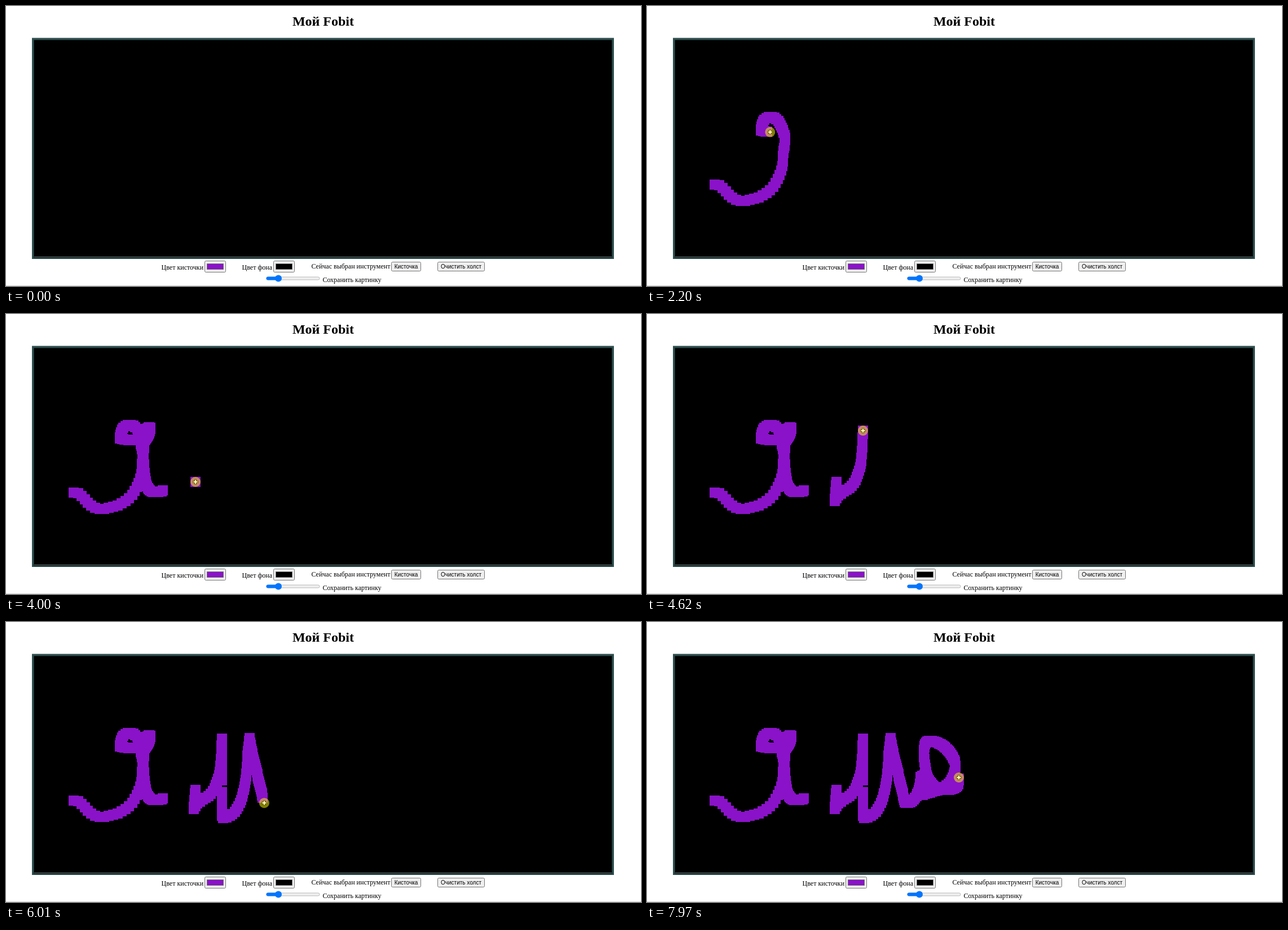
Recreate the animation shown at these times as an HTML page with a canvas. Size 1126 by 497 pixels, loop 8 s.

```html
<!DOCTYPE html>
<html lang="ru">
<head>
<meta charset="utf-8">
<style>
html, body { margin: 0; width: 1126px; height: 497px; overflow: hidden; background: #fff; }
canvas { display: block; }
</style>
</head>
<body>
<canvas id="stage" width="1126" height="497"></canvas>
<script>
const ctx = document.getElementById('stage').getContext('2d');
const LOOP = 8000, STEP = 70, BRUSH = 18, LAG = 38, STAMP_EVERY = 16;
const PURPLE = '#8a12c8', SLATE = '#2f4f4f';
const SERIF = '"Liberation Serif", "Times New Roman", serif';
const SANS = '"Liberation Sans", Arial, sans-serif';

const linear = k => k;
const easeOut = k => 1 - (1 - k) ** 2;

function leg(from, to, d, ease = linear) {
  const path = document.createElementNS('http://www.w3.org/2000/svg', 'path');
  path.setAttribute('d', d);
  return { from, to, path, ease, length: path.getTotalLength() };
}

// The pointer follows these curves and rests between them.
const legs = [
  leg(70, 810, 'M964 460 C560 330 200 212 127 312', easeOut),
  leg(890, 1080, 'M127 312 L121 316'),
  leg(1230, 1570, 'M120 317 C134 313 146 346 166 346 S235 338 241 274'),
  leg(1570, 1990, 'M241 274 C241 255 247 240 244 230 S234 197 221 197 S202 207 202 221'),
  leg(2060, 2900, 'M202 221 C210 223 230 227 238 220 S250 201 254 201 S256 214 239 232'),
  leg(2900, 3480, 'M239 232 C245 245 244 275 247 293 S255 316 265 316 S279 314 279 311'),
  leg(3580, 3930, 'M279 311 Q300 312 336 298'),
  leg(4010, 4490, 'M336 298 L333 333 C340 312 360 318 371 293 S381 240 383 207'),
  leg(4620, 4700, 'M383 207 V283'),
  leg(4720, 5180, 'M383 302 V348 C418 347 426 292 428 240'),
  leg(5180, 5390, 'M428 240 L432 206'),
  leg(5520, 6290, 'M432 206 C436 240 447 270 457 321 C475 324 485 300 485 275 L492 271'),
  leg(6360, 6780, 'M492 271 L487 308 C505 298 541 303 547 259'),
  leg(6780, 7130, 'M547 259 C547 232 520 211 500 211'),
  leg(7200, 7930, 'M500 211 C486 211 492 250 494 262 C497 285 510 298 530 298 S553 290 553 276')
];
const presses = [[1230, 3480], [3930, 4700], [4720, LOOP]];
const bursts = [70, 890, 1230, 2060, 2900, 3730, 4620, 5520, 6360, 7200];

function snap(t) {
  const start = bursts.findLast(b => b <= t) ?? 0;
  return start + Math.floor((t - start + 10) / STEP) * STEP;
}

function pointerAt(t) {
  const current = legs.findLast(l => l.from <= t) ?? legs[0];
  const k = Math.min(1, Math.max(0, (t - current.from) / (current.to - current.from)));
  return current.path.getPointAtLength(current.ease(k) * current.length);
}

const stamps = [];
for (const [from, to] of presses) {
  for (let t = from; t <= to; t += STAMP_EVERY) {
    const { x, y } = pointerAt(t);
    stamps.push({ t, x: Math.round(x), y: Math.round(y) });
  }
}

function rect(x, y, w, h, color) {
  ctx.fillStyle = color;
  ctx.fillRect(x, y, w, h);
}

function outline(color) {
  ctx.strokeStyle = color;
  ctx.lineWidth = 1;
  ctx.stroke();
}

function box(x, y, w, h, radius, fill, stroke) {
  ctx.beginPath();
  ctx.roundRect(x, y, w, h, radius);
  ctx.fillStyle = fill;
  ctx.fill();
  if (stroke) outline(stroke);
}

function disc(x, y, r, color) {
  ctx.beginPath();
  ctx.arc(x, y, r, 0, Math.PI * 2);
  ctx.fillStyle = color;
  ctx.fill();
}

function text(label, x, y, font = '12px ' + SERIF, align = 'left') {
  ctx.font = font;
  ctx.textAlign = align;
  ctx.fillStyle = '#000';
  ctx.fillText(label, x, y);
}

function colorInput(x, color) {
  box(x + 0.5, 452.5, 37, 20, 2, '#efefef', '#767676');
  box(x + 4.5, 457.5, 29, 10, 0, color, '#777');
}

function button(label, x, w) {
  box(x + 0.5, 454.5, w, 16, 2, '#efefef', '#767676');
  text(label, x + 0.5 + w / 2, 466, '10px ' + SANS, 'center');
}

function drawPage() {
  rect(0, 0, 1126, 497, '#fff');
  text('Мой Fobit', 562.5, 35, 'bold 24px ' + SERIF, 'center');
  rect(46, 56.6, 1032, 392.4, SLATE);
  rect(49.6, 60.4, 1024.8, 386.6, '#000');
  rect(50, 445, 1024, 1, '#6f8888');
  text('Цвет кисточки', 275.6, 468);
  colorInput(352, PURPLE);
  text('Цвет фона', 418.6, 468);
  colorInput(474, '#000');
  text('Сейчас выбран инструмент', 541.4, 466);
  button('Кисточка', 683, 52);
  button('Очистить холст', 765, 83);
  box(462, 481, 94, 5, 2.5, '#efefef', '#b8b8b8');
  box(461.5, 480.5, 22, 6, 3, '#0075ff');
  disc(483, 483.5, 6, '#0075ff');
  text('Сохранить картинку', 561.4, 490);
  rect(0, 496, 1126, 1, '#d4d4d4');
}

function drawPaint(t) {
  for (const s of stamps) {
    if (s.t > t - LAG) break;
    rect(s.x - BRUSH / 2, s.y - BRUSH / 2, BRUSH, BRUSH, PURPLE);
  }
}

function drawArrow(x, y) {
  ctx.save();
  ctx.translate(x, y);
  const shape = new Path2D('M0 0 V12 L3 9.5 L5 14 L7 13 L5 8.5 H9 Z');
  ctx.fillStyle = '#fff';
  ctx.fill(shape);
  ctx.strokeStyle = '#000';
  ctx.lineWidth = 1;
  ctx.stroke(shape);
  ctx.restore();
}

function drawPlus(x, y, held) {
  const cross = (arm, half, color) => {
    rect(x - arm, y - half, arm * 2, half * 2, color);
    rect(x - half, y - arm, half * 2, arm * 2, color);
  };
  cross(4.5, 2, held ? '#5c5000' : '#000');
  cross(3.6, 1.1, held ? '#ffffb4' : '#fff');
}

function drawPointer(t) {
  if (t < legs[0].from) return;
  const { x, y } = pointerAt(t);
  if (y > 446) return drawArrow(x, y);
  const held = presses.some(([from, to]) => t >= from && t <= to);
  if (held) disc(x, y, 9, 'rgba(255, 255, 0, 0.5)');
  drawPlus(x, y, held);
}

const start = performance.now();
function frame() {
  const t = snap((performance.now() - start) % LOOP);
  drawPage();
  drawPaint(t);
  drawPointer(t);
  requestAnimationFrame(frame);
}
frame();
</script>
</body>
</html>
```
